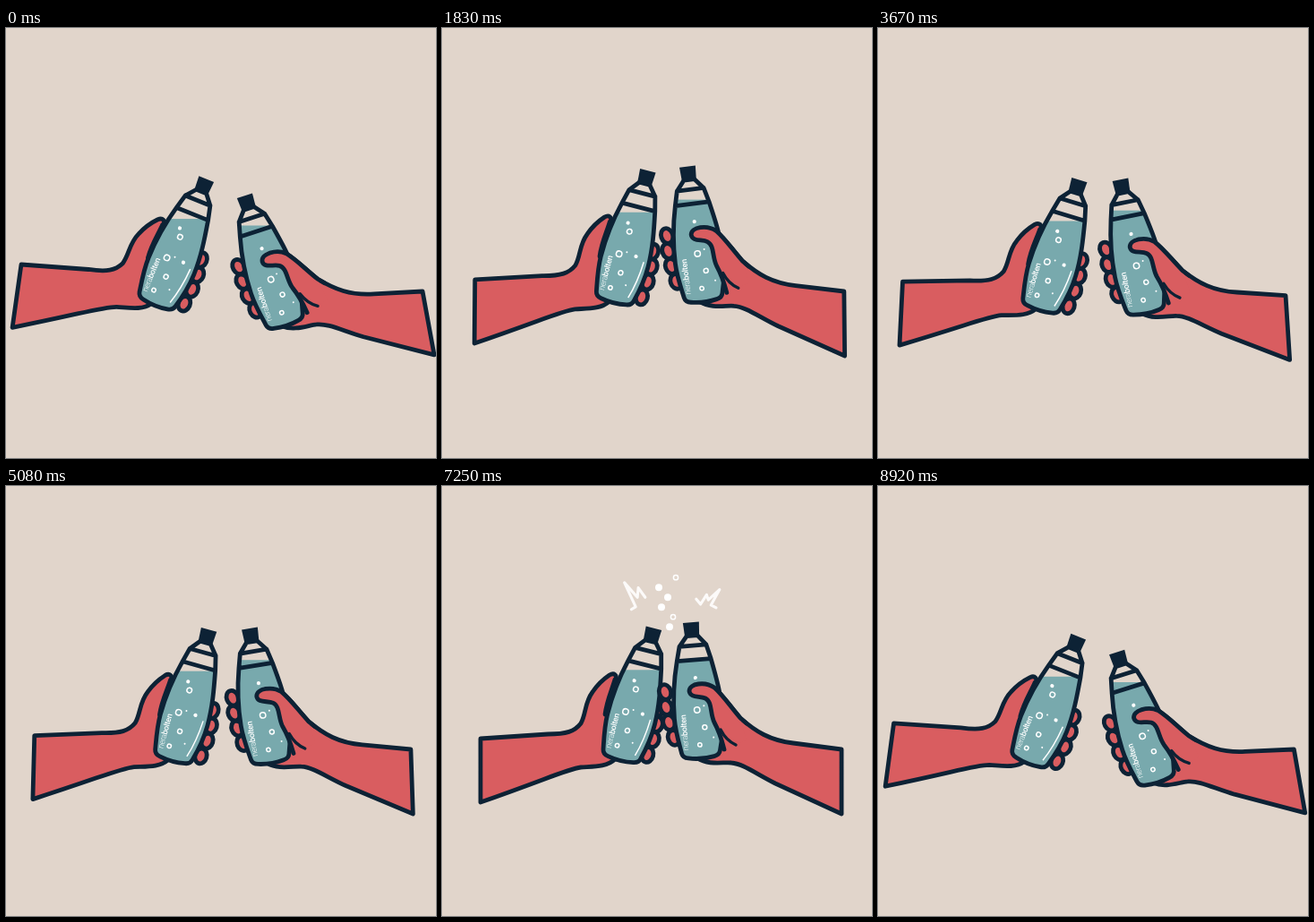
Write an HTML page that moves like this. It is 480 by 480 pixels and loops after 9.01 s.

```html
<!DOCTYPE html>
<html lang="en">
<head>
<meta charset="utf-8">
<title>Cheers</title>
<style>
  html, body { margin: 0; width: 100%; height: 100%; overflow: hidden; background: #e1d5cb; }
  svg { display: block; width: 100vw; height: 100vh; }
  .ink { stroke: #0d2235; stroke-width: 4.8; stroke-linejoin: round; stroke-linecap: round; fill: none; }
  .skin { fill: #d95d60; }
  .glass { fill: #e1d5cb; }
  .ring { fill: none; stroke: #fff; stroke-width: 1.5; }
  .dot { fill: #fff; }
  text { font: 300 9px Roboto, Arial, sans-serif; fill: #fff; letter-spacing: -.3px; }
  .strong { font-weight: 500; }
</style>
</head>
<body>
<svg id="stage" viewBox="0 0 480 480"></svg>
<script>
const LOOP = 9010, FRAMES = 108, CYCLE = 36, CLINK = 12, RELEASE = 15;
const byId = id => document.getElementById(id);
const repeat = (n, draw) => Array.from({ length: n }, (_, i) => draw(i)).join('');

const BODY = 'M-6 7 L-15 18 L-19 34 C-24 54 -27 76 -27 98 C-27 112 -24 126 -22 137 ' +
  'Q-21 142 -15 143 Q0 146 14 143 Q20 142 21 137 C24 126 27 112 27 96 C27 74 23 54 19 34 L15 18 L6 7 Z';

// Fizz inside a bottle: x, y, radius; the larger ones are rings.
const FIZZ = [[-7, 54, 2.1], [-3, 63, 2.8], [-8, 90, 3.2], [0, 86, 1],
  [11, 88, 2.1], [-1, 110, 2.5], [8, 122, 1], [-8, 129, 2.2]];

const circle = (x, y, r, ring) =>
  `<circle cx="${x}" cy="${y}" r="${r}" class="${ring ? 'ring' : 'dot'}"/>`;

// Bottle drawn upright, with the centre of its cap at the origin.
const bottle = (id, fizzShift, shine = '') => `
  <g id="${id}Bottle">
    <path d="${BODY}" class="glass"/>
    <g clip-path="url(#body)">
      <rect id="${id}Liquid" x="-120" width="240" height="240" fill="#78a9ad"/>
    </g>
    ${FIZZ.map(([x, y, r]) => circle(x + fizzShift, y, r, r > 2.1)).join('')}
    <path d="${shine}" class="ring"/>
    <text transform="translate(-14 134) rotate(-90)">nera<tspan class="strong">bolten</tspan></text>
    <path d="${BODY} M-15 18 H15 M-19 34 H19" class="ink"/>
    <path d="M-9 -8 H9 L8 8 H-8 Z" fill="#0d2235"/>
  </g>`;

// Four fingertips along a gentle curve.
const fingers = (x, y, bend, tilt) => repeat(4, i =>
  `<ellipse rx="6.5" ry="8.5" class="ink skin"
    transform="translate(${x + bend * i * i} ${y + 17 * i}) rotate(${tilt})"/>`);

const THUMB_TOP = 'C321 246 314 235 304 226 C294 219 276 221 276 230';
const THUMB_INSIDE = 'C277 238 288 235 294 238 C302 242 299 255 304 265 C310 276 313 287 315 295';

stage.innerHTML = `
  <clipPath id="body"><path d="${BODY}"/></clipPath>
  <g id="left">
    <path class="ink skin" d="M43 279 L118 274 C139 274 148 271 155 262 C161 251 159 239 168 227
      C174 218 181 212 187 208 C192 205 196 208 194 214 L215 240 L215 300
      L193 302 C184 311 168 310 155 311 C140 313 120 323 43 350 Z"/>
    ${fingers(241, 246, -1.3, 15)}
    <path class="ink" d="M193 213 C190 224 184 236 182 252"/>
    ${bottle('left', 0, 'M21 92 Q20 116 14 135')}
  </g>
  <g id="right">
    <path class="ink skin" d="M446 295 L392 288 C366 285 350 275 333 260 ${THUMB_TOP}
      L285 305 C298 313 314 309 323 310 C336 311 350 322 372 333 L446 367 Z"/>
    ${fingers(249, 231, 1.1, -18)}
    ${bottle('right', 7)}
    <path class="skin" d="M333 260 ${THUMB_TOP} ${THUMB_INSIDE} L340 285 Z"/>
    <path class="ink" d="M340 266 L333 260 ${THUMB_TOP} ${THUMB_INSIDE}"/>
    <path class="ink" style="stroke-width:3.4" d="M311 273 Q317 285 328 290"/>
  </g>
  <g id="burst" class="ink" style="stroke:#fff;stroke-width:3.2">
    <path d="M-40 -23 L-35 -26 L-48 -54 L-33 -37 L-32 -48 L-24 -37"/>
    <path d="M35 -35 L40 -29 L47 -40 L49 -34 L62 -46 L52 -28 L58 -25"/>
  </g>
  <g id="spray"></g>`;

// How far the arms are drawn apart: 0 while the bottles touch, 1 at the widest.
function apart(frame) {
  if (frame < CLINK) {
    const left = Math.min(1, (CLINK - frame) / (CLINK - 1));
    return 1 - (1 - left) ** 2;
  }
  const u = Math.max(0, (frame - RELEASE) / (CYCLE + 1 - RELEASE));
  return u * u * (3 - 2 * u);
}

function place(id, arm, hold) {
  const set = (name, value) => byId(name).setAttribute('transform', value);
  set(id, `translate(${arm.x} ${arm.y}) rotate(${arm.angle}) translate(${-arm.elbow[0]} ${-arm.elbow[1]})`);
  set(id + 'Bottle', `translate(${hold.cap}) rotate(${hold.lean}) rotate(${hold.tilt} 0 144)`);
  // The surface stays level with the world.
  set(id + 'Liquid', `translate(0 ${hold.depth}) rotate(${-arm.angle - hold.lean - hold.tilt})`);
}

function arms(frame) {
  const pull = apart(frame);
  const swing = pull * pull;
  const press = (1 - pull) ** 4;
  const dip = frame <= CLINK ? Math.sin(Math.PI * frame / (CLINK - 1)) : 0;
  place('left',
    { elbow: [43, 279], x: 43 - 26 * pull, y: 282 - 18 * swing + 10 * dip, angle: 8 * swing },
    { cap: [232.5 + 2 * press, 163.5], lean: 14, tilt: 0, depth: 40 });
  place('right',
    { elbow: [446, 295], x: 446 + 9.5 * (pull + swing), y: 294 + 6 * dip, angle: -10.4 * swing },
    { cap: [271, 162], lean: -7.6, tilt: 3 * press, depth: 27 + 7 * press });
}

const DROP_X = [261, 242, 252, 245, 258, 254];

function splash(frame) {
  const age = frame - CLINK + 1;
  const burst = byId('burst');
  const grow = 1.05 * (1 - .62 * .6 ** age);
  burst.style.opacity = age < 0 ? 0 : Math.max(0, Math.min(.9, (7 - age) * .32));
  burst.setAttribute('transform', `translate(250 160) scale(${age < 0 ? 1 : grow})`);
  // Drops rise steadily out of the necks, each popping a little lower than the one before.
  byId('spray').innerHTML = age < 0 ? '' : DROP_X.map((x, i) => {
    const y = 145 + 11 * i - 10.7 * age;
    const ring = i % 4 === 0;
    return y < 170 && y > 68 + 9 * i ? circle(x + .6 * (age - 4), y, ring ? 2.6 : 4, ring) : '';
  }).join('');
}

const start = performance.now();
let shown = -1;
function tick() {
  const time = (performance.now() - start) % LOOP;
  const frame = Math.floor(time * FRAMES / LOOP + .15) % CYCLE;
  if (frame !== shown) {
    shown = frame;
    arms(frame);
    splash(frame);
  }
  requestAnimationFrame(tick);
}
tick();
</script>
</body>
</html>
```
